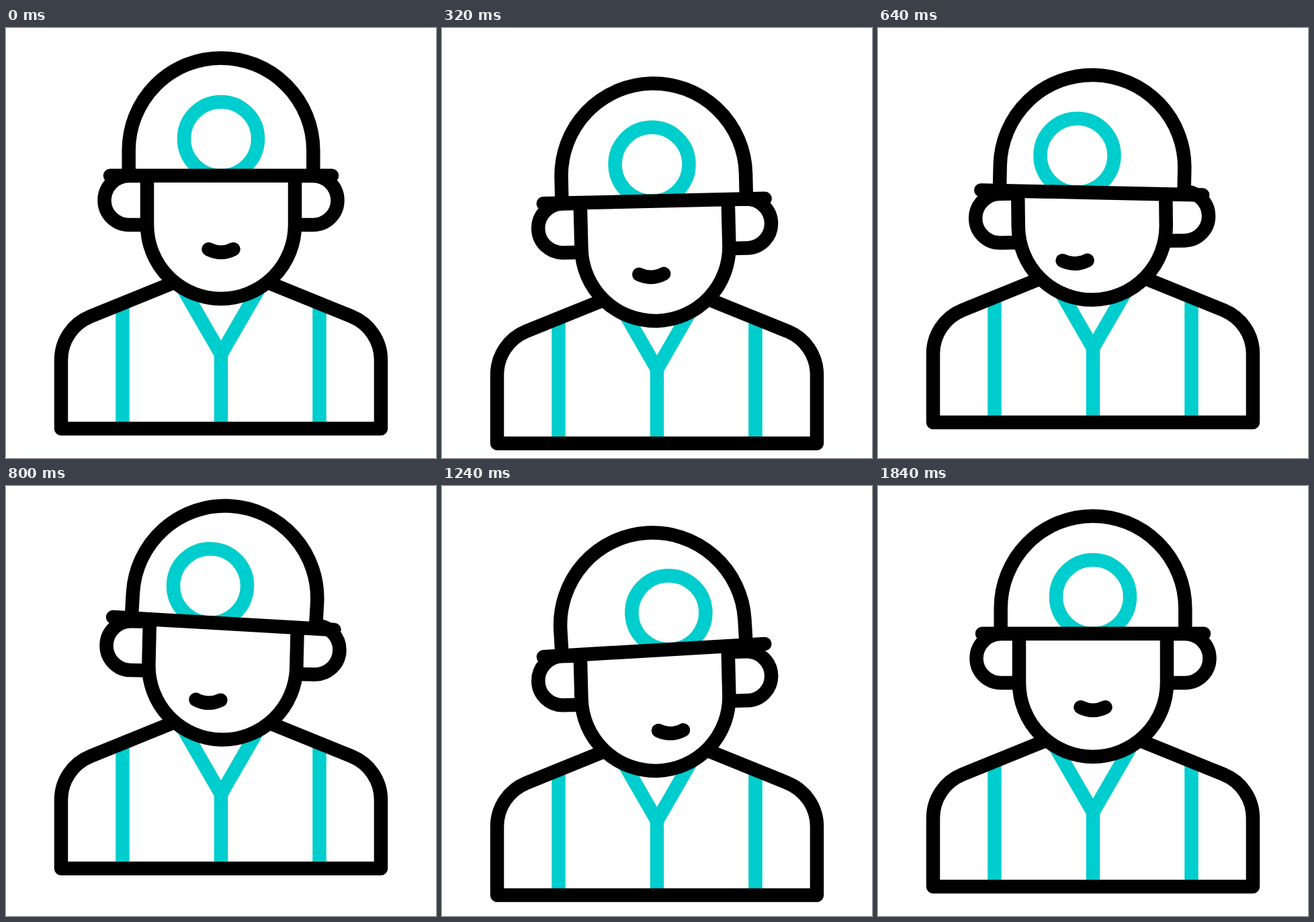
Animation, 640 px wide and 640 px high, one loop 2.24 s. Source, as an HTML page:

```html
<!DOCTYPE html>
<html lang="en">
<head>
<meta charset="utf-8">
<title>Worker in a helmet</title>
<style>
  html, body { margin: 0; width: 100%; height: 100%; overflow: hidden; background: #fff; }
  svg { display: block; width: 100%; height: 100%; }
  .line { fill: none; stroke: #000; stroke-width: 20.5; stroke-linecap: round; stroke-linejoin: round; }
  .accent { stroke: #00cdcd; stroke-linecap: butt; stroke-linejoin: miter; }
  .solid { fill: #fff; stroke-linecap: butt; }
</style>
</head>
<body>
<svg viewBox="0 0 640 640">
  <defs>
    <clipPath id="aboveBand"><rect x="150" y="20" width="340" height="200"/></clipPath>
  </defs>
  <g id="body">
    <path class="line accent" d="M173.5 410V596M466.5 410V596M320 485.5V596"/>
    <path class="line accent" d="M261 383.3L320 485.5L379 383.3"/>
    <path class="line" d="M252 378L125.7 429.2A70 70 0 0 0 82 494V596.2H558V494A70 70 0 0 0 514.3 429.2L388 378"/>
  </g>
  <g id="head">
    <g id="ears">
      <path class="line" d="M214 220H183A36.5 36.5 0 0 0 183 293H214M426 220H457A36.5 36.5 0 0 1 457 293H426"/>
    </g>
    <path class="line solid" d="M210 215V293A110 110 0 0 0 430 293V215"/>
    <g id="mouth"><path class="line" d="M301.5 329.3Q320 338.5 338.5 329.3"/></g>
    <g id="helmet">
      <path class="line solid" d="M182.7 219.8V182A137.3 137.3 0 0 1 457.3 182V219.8"/>
      <g clip-path="url(#aboveBand)">
        <g id="lamp"><circle class="line accent" cx="320" cy="165" r="55"/></g>
      </g>
      <path class="line" d="M155 219.8H485"/>
    </g>
  </g>
</svg>
<script>
  const LOOP = 2240, FRAME = 40, REST = 1840;

  const ease = u => (1 - Math.cos(Math.PI * u)) / 2;

  // Eases from 0 through evenly spaced peaks and back to 0 at the end.
  function swing(t, delay, step, peaks, end = delay + step * (peaks.length + 1)) {
    if (t <= delay || t >= end) return 0;
    const i = Math.min(Math.floor((t - delay) / step), peaks.length);
    const from = i ? peaks[i - 1] : 0;
    const to = i < peaks.length ? peaks[i] : 0;
    const t0 = delay + i * step;
    const length = i < peaks.length ? step : end - t0;
    return from + (to - from) * ease((t - t0) / length);
  }

  function place(id, x, y, turn = 0, pivotY = 0) {
    document.getElementById(id).setAttribute("transform",
      `translate(${x} ${y}) rotate(${turn} 320 ${pivotY})`);
  }

  function draw(t) {
    // The nod travels upwards: each part follows the one below a little later.
    const bodyY = swing(t, 0, 400, [24.5, -27, 13]);
    const headY = swing(t, 80, 400, [16.5, 0, 8.5]);
    const headTurn = swing(t, 70, 400, [-2.1, 1.6, -1.5]);
    const earsY = swing(t, 200, 400, [24.2, -4.8, 16]);
    const helmetY = swing(t, 200, 410, [24, -7.3, 12.5]);

    // The look to one side and then the other.
    const mouthX = swing(t, 140, 535, [-26.5, 22], REST);
    const mouthY = swing(t, 140, 535, [15, 14], REST);
    const lampX = swing(t, 230, 505, [-25, 25], REST);
    const helmetTurn = swing(t, 230, 510, [2.1, -1.9], REST);

    place("body", 0, bodyY);
    place("head", 0, bodyY + headY, headTurn, 395);
    place("ears", 0, earsY);
    place("mouth", mouthX, mouthY);
    place("helmet", 0, helmetY, helmetTurn, 219.8);
    place("lamp", lampX, 0);
  }

  const start = performance.now();
  function tick() {
    const t = (performance.now() - start) % LOOP;
    draw(Math.floor(t / FRAME) * FRAME);
    requestAnimationFrame(tick);
  }
  draw(0);
  requestAnimationFrame(tick);
</script>
</body>
</html>
```
